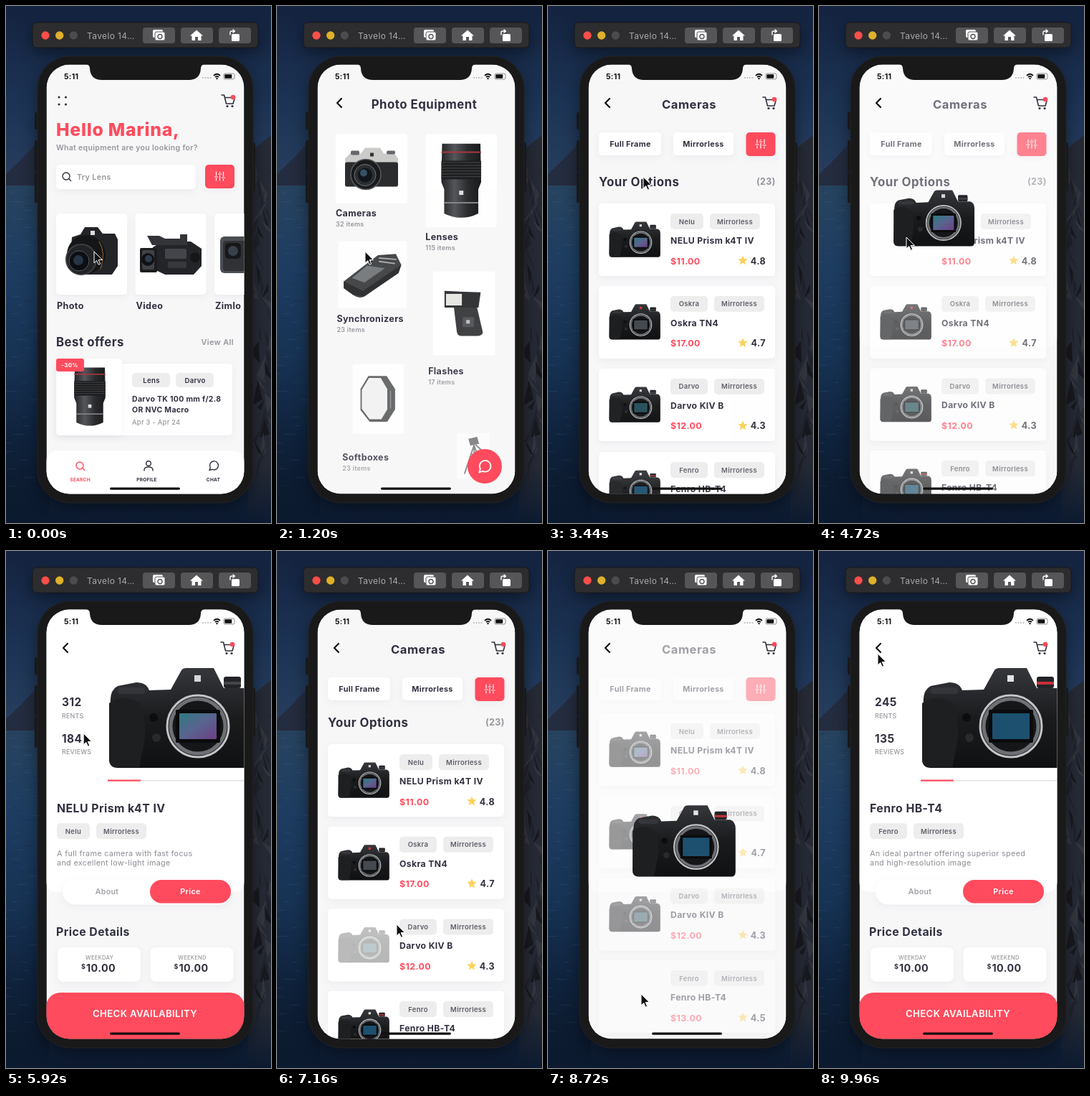
An HTML page for the animation above (10 s loop, 370 by 720 pixels).

```html
<!DOCTYPE html>
<html lang="en">
<head>
<meta charset="utf-8">
<title>Camera rental</title>
<style>
html, body { margin: 0; width: 100%; height: 100%; overflow: hidden; background: #12233f; }
svg { display: block; }
text { font-family: Inter, sans-serif; letter-spacing: .03em; }
.line { fill: none; stroke-linecap: round; stroke-linejoin: round; }
.card { filter: drop-shadow(0 3px 5px rgba(40, 40, 70, .05)); }
.window { filter: drop-shadow(0 7px 10px rgba(0, 0, 0, .4)); }
</style>
</head>
<body>
<svg id="stage" width="370" height="720" viewBox="0 0 370 720"></svg>
<script>
const LOOP = 10000;
const RED = '#ff4b5d', INK = '#30303f', GRAY = '#96969c', PAGE = '#f7f7f8', DARK = '#232427';

// Drawing helpers
const rect = (x, y, w, h, r, fill, more = '') =>
  `<rect x="${x}" y="${y}" width="${w}" height="${h}" rx="${r}" fill="${fill}" ${more}/>`;
const dot = (x, y, r, fill, more = '') => `<circle cx="${x}" cy="${y}" r="${r}" fill="${fill}" ${more}/>`;
const ring = (x, y, r, fill, color, width) => dot(x, y, r, fill, `stroke="${color}" stroke-width="${width}"`);
const path = (d, fill) => `<path d="${d}" fill="${fill}"/>`;
const line = (d, color, width = 1.5) => `<path class="line" d="${d}" stroke="${color}" stroke-width="${width}"/>`;
const text = (x, y, size, weight, fill, str, anchor = 'start') =>
  `<text x="${x}" y="${y}" font-size="${size}" font-weight="${weight}" fill="${fill}" text-anchor="${anchor}">${str}</text>`;
const mid = (x, y, size, weight, fill, str) => text(x, y, size, weight, fill, str, 'middle');
const group = (id, ...body) => `<g id="${id}">${body.join('')}</g>`;
const at = (x, y, body, s = 1) => `<g transform="translate(${x} ${y}) scale(${s})">${body}</g>`;
const card = (x, y, w, h, r = 5, fill = '#fff') => rect(x, y, w, h, r, fill, 'class="card"');
const tagWidth = str => Math.min(70, 22 + 6 * str.length);
const tag = (x, y, str) => rect(x, y, tagWidth(str), 22, 5, '#ededee') +
  mid(x + tagWidth(str) / 2, y + 14.5, 9.5, 600, '#5c5c66', str);
const tags = (x, y, brand) => tag(x, y, brand) + tag(x + tagWidth(brand) + 9, y, 'Mirrorless');
const times = (n, draw) => Array.from({ length: n }, (_, i) => draw(i)).join('');

let seed = 7;
const rand = (a, b) => {
  seed = seed * 16807 % 2147483647;
  return Math.round(a + (b - a) * seed / 2147483647);
};

// Icons
const back = (x, y) => line(`M${x + 3} ${y - 6}l-6 6 6 6`, '#111', 2.2);
const cart = (x, y) => at(x, y, line('M-9-8h3.5l3 12h9.5l2.5-8.5h-14', INK, 1.6) +
  dot(-1, 7.5, 1.6, INK) + dot(6, 7.5, 1.6, INK) + dot(7, -5, 3.3, RED));
const sliders = (x, y) => card(x - 20.5, y - 16, 41, 33, 5, RED) +
  at(x, y, line('M-5-6v5M-5 3v3M0-6v1M0-1v7M5-6v6M5 4v2M-7 1h4M-2-3h4M3 2h4', '#fff', 1.2));
const search = (x, y, c) => ring(x, y, 5, 'none', c, 1.4) + line(`M${x + 3.6} ${y + 3.6}l3 3`, c, 1.4);
const bubble = (x, y, c, s = 1) => at(x, y, line('M-6 6.5l1.3-3.6a6 6 0 1 1 2.6 2.4z', c, 1.4), s);
const star = (x, y) => {
  const point = i => {
    const a = i * Math.PI / 5, r = i % 2 ? 3.2 : 7;
    return `${(x + r * Math.sin(a)).toFixed(1)} ${(y - r * Math.cos(a)).toFixed(1)} `;
  };
  return path(`M${times(10, point)}Z`, '#fcd25b');
};

// Camera body without lens, about 200 wide and centred on 0,0
const camera = ({ sensor, accent, badge }) =>
  path('M-98-18Q-100-38-88-44L-62-49Q-48-49-44-38L-14-39 1-66Q3-69 8-69H46L60-41H90Q101-38 101-24V60Q101 70 92 70H-88Q-100 70-100 58Z', 'url(#body)') +
  path('M-100-20Q-80-34-57-20Q-48 0-50 30L-58 69H-88Q-100 70-100 56Z', '#1e1f21') +
  rect(-88, -42, 38, 9, 4, '#35363a') + rect(60, -57, 24, 16, 3, DARK) + rect(60, -50, 24, 4, 1, accent) +
  dot(-38, 0, 6, '#0c0d0e') + dot(-34, 28, 6, '#292a2d') +
  ring(24, 12, 43, '#1b1d20', '#c3c4c6', 3) + ring(24, 12, 38, '#141618', '#6d7074', 5) +
  rect(-7, -11, 62, 46, 2, '#0a0b0c') + rect(-2, -6, 52, 36, 1, sensor) + rect(19, -59, 9, 9, 0, badge);

const shot = (brand, name, price, rate, sensor, accent = '#44464a', badge = '#d5d6d8') =>
  ({ brand, name, price, rate, sensor, accent, badge });
const CAMS = [
  shot('Nelu', 'NELU Prism k4T IV', 11, 4.8, 'url(#iris)'),
  shot('Oskra', 'Oskra TN4', 17, 4.7, '#454a50', '#3a3b3f', '#d8333d'),
  shot('Darvo', 'Darvo KIV B', 12, 4.3, '#27505b'),
  shot('Fenro', 'Fenro HB-T4', 13, 4.5, '#1d506f', '#c8303b', '#e4e4e6'),
];

// Equipment pictures, each centred on 0,0
const lens = path('M-27-52H27L28 2 24 12V46Q0 58-24 46V12L-28 2Z', 'url(#barrel)') + rect(-28, -41, 56, 2, 0, '#a83741') +
  rect(-28, -28, 56, 26, 1, '#1c1d1f') + times(6, i => rect(-28, -26 + 4 * i, 56, 1, 0, '#4a4b4e')) +
  rect(-24, 30, 48, 2, 0, '#85868a') + rect(-3, 14, 6, 6, 0, '#ddd');
const slr = path('M-37-14L-30-21H-15L-9-29H12L17-21H32L37-14V25H-37Z', '#cbccca') + rect(-37, -9, 74, 34, 3, '#2b2c2e') +
  rect(-29, -25, 12, 6, 2, '#66676a') + rect(21, -25, 12, 5, 2, '#66676a') + rect(-2, -22, 5, 5, 0, '#333') +
  ring(-8, 8, 21, '#191a1c', '#565a5e', 1.5) + ring(-9, 9, 15, '#2c2f32', '#70757a', 1) + dot(-9, 9, 10, '#10161c') + dot(-11, 6, 5, '#375064');
const trigger = path('M-42 10L-8-16 8-28 34-30 42-14 38-4-12 32Q-20 36-28 30L-42 20Z', '#434446') +
  path('M-30 5L-8-13 18-9-12 12Z', '#777a7c') + path('M-42 10L-14 24 42-14 38-2-12 32-28 30-42 20Z', '#2b2c2e') + line('M10-24l24 2M10-19l22 3', '#aaa', 2);
const flash = path('M-27-31L23-29 20-8H-27Z', DARK) + path('M-25-27H-3V-11H-25Z', '#e4e4e0') +
  path('M-14-8H18L26 26Q25 31 18 31H-4Q-9 31-10 25Z', '#303134') + rect(-2, 5, 16, 14, 1, '#494b50') + rect(3, 9, 5, 5, 0, '#bbb');
const softbox = path('M-15-35H13L26-15V16L14 35H-13L-27 17V-15Z', '#4a4b4e') +
  path('M-14-32H4L14-15V16L5 31H-13L-25 15V-14Z', '#f1f1f1') + line('M19-12v26', '#85868a');
const tripod = path('M-8-28L6-31 9-20-5-17Z', '#46474a') + line('M1-18L-14 27M1-18L2 30M1-18L13 18M-4-4L7-2M4-18L15-8', '#4a4b4e', 2);

// Two columns of cards, stacked with a fixed gap
const KIT = [
  { name: 'Cameras', count: 32, pic: slr, h: 97 }, { name: 'Lenses', count: 115, pic: lens, h: 130 },
  { name: 'Synchronizers', count: 23, pic: trigger, h: 97 }, { name: 'Flashes', count: 17, pic: at(0, 0, flash, 1.16), h: 134 },
  { name: 'Softboxes', count: 23, pic: at(0, 0, softbox, 1.28), h: 136 }, { name: 'Tripods', count: 12, pic: at(0, 0, tripod, 1.9), h: 140 },
];
const bottoms = [129, 129];
KIT.forEach((item, i) => {
  const top = bottoms[i % 2] + 49;
  bottoms[i % 2] = top + item.h;
  item.x = i % 2 ? 257 : 132;
  item.y = top + item.h / 2;
});

// Desktop and phone
const scenery = rect(0, 0, 370, 270, 0, 'url(#sky)') + path('M0 234L17 218 44 190 60 182V262H0Z', '#242c3f') +
  rect(0, 250, 60, 470, 0, 'url(#sea)') + times(70, i => rect(rand(-8, 40), 254 + 6 * i, rand(4, 16), 1, 0, i % 2 ? '#5a7fa6' : '#081a30', 'opacity=".16"')) +
  path('M370 180L338 205V720H370Z', '#262a35') +
  times(45, i => {
    const x = rand(344, 368), y = 215 + 9 * i;
    return path(`M${x} ${y}l${rand(-16, 16)} ${rand(8, 30)} ${rand(-18, 18)} ${rand(4, 18)}Z`, ['#33363e', '#17191f', '#20232b'][i % 3]);
  }) + rect(0, 640, 370, 80, 0, 'url(#floor)');

const toolbar = `<g class="window">${rect(37, 23, 315, 35, 6, '#2d2d2f', 'stroke="#18191d"')}</g>` +
  ['#f94e4a', '#dfb02b', '#4c4c4f'].map((c, i) => dot(55 + 19.7 * i, 41, 5.7, c)).join('') + text(113, 45.5, 12, 400, '#a9a9ab', 'Tavelo 14…') +
  times(3, i => rect(191 + 53 * i, 30, 45, 22, 4, '#565658')) +
  rect(205, 33, 14, 11, 2, '#fff') + rect(208, 36, 14, 12, 2, '#fff', 'stroke="#565658"') + ring(215, 42.5, 3, 'none', '#565658', 1.4) +
  path('M257 41.5L266 33.5 275 41.5H272.5V48H268V43H264V48H259.5V41.5Z', '#fff') +
  rect(315, 39, 11, 10, 1.5, '#fff') + line('M313 40v-3q0-2 2-2h4M317 33l2.5 2-2.5 2', '#fff', 1.4);

const phone = '<g class="window">' + [148, 187, 231].map((y, i) => rect(40, y, 6, i ? 43 : 24, 2, '#17181a')).join('') +
  rect(343, 190, 5, 68, 2, '#17181a') + rect(44, 70, 301, 622, 45, '#19191a', 'stroke="#222224"') + '</g>';
const status = path('M112 81Q117 82 117 87Q118 103 134 103H255Q271 103 272 87Q272 82 277 81Z', '#19191a') +
  text(81, 102, 10.5, 700, '#111', '5:11') + times(4, i => dot(275 + 3.5 * i, 100, 1, '#b5b5b8')) +
  line('M290.5 96.5q4-3.5 8 0M292.5 98.7q2-1.8 4 0', '#111', 1.7) + dot(294.5, 101, 1.2, '#111') +
  rect(304, 94, 15, 8, 2, 'none', 'stroke="#777" stroke-width=".8"') + rect(305.3, 95.3, 10, 5.4, 1, '#111');

// Home
const photoPic = path('M92 322L104 318 110 308H128L135 317H152L156 325V362L148 374H103L90 352Z', DARK) + rect(118, 313, 6, 6, 0, '#ddd') +
  dot(112, 346, 27, '#141517') + ring(105, 353, 21, '#222326', '#3c3e41', 2) + ring(102, 355, 14, '#0b0e13', '#545960', 1) + dot(101, 354, 7, '#263443') + line('M130 328q10 16 2 38', '#a06a3a', 1);
const videoPic = path('M205 336L218 328H258L273 338V362L262 374H222L205 366Z', DARK) + path('M197 320H214L222 324H243V318H253V333H204Z', '#333438') +
  rect(187, 337, 24, 34, 2, '#1b1c1e') + rect(190, 340, 17, 27, 3, '#404247') + dot(198, 353, 9, '#0e1115') + dot(199, 352, 5, '#2e3b4a') +
  rect(222, 338, 30, 14, 2, '#43454a') + rect(226, 356, 26, 9, 2, '#36383c') + dot(264, 350, 7, '#151618');
const actionPic = rect(299, 321, 60, 51, 6, '#4b4e52') + rect(303, 327, 40, 42, 4, '#303236') + rect(306, 330, 22, 22, 5, '#17181a') + dot(317, 341, 7, '#39414b');
const tiles = [['Photo', photoPic], ['Video', videoPic], ['Zimlo', actionPic]].map(([name, pic], i) =>
  card(70 + 110.5 * i, 289, 99, 113) + pic + text(71 + 110.5 * i, 422, 12.6, 700, INK, name)).join('');

const home = [
  times(4, i => dot(74 + 9.5 * (i % 2), i < 2 ? 127 : 137, 1.6, INK)) + cart(310, 132) +
  text(70, 181, 24.8, 800, RED, 'Hello Marina,') + text(70, 201, 10.5, 600, GRAY, 'What equipment are you looking for?') +
  card(70, 221, 195, 34) + search(84, 237, INK) + text(99, 242, 10.8, 600, GRAY, 'Try Lens') + sliders(298.5, 237),
  tiles,
  text(70, 474, 16.8, 700, INK, 'Best offers') + text(318, 472, 11, 600, GRAY, 'View All', 'end') +
  card(70, 498, 246, 100) + card(70, 491, 92, 107) + at(117, 544, lens, .78) + rect(70, 491, 39, 18, 3, RED) + mid(89, 503, 8, 700, '#fff', '-30%') +
  ['Lens', 'Darvo'].map((s, i) => rect(176 + 61 * i, 511, 53, 20, 5, '#ededee') + mid(203 + 61 * i, 525, 9.6, 600, INK, s)).join('') +
  text(176, 551, 10.5, 700, INK, 'Darvo TK 100 mm f/2.8') + text(176, 566, 10.5, 700, INK, 'OR NVC Macro') + text(176, 583, 9.3, 500, GRAY, 'Apr 3 - Apr 24'),
  rect(56, 619, 277, 80, 16, '#fff') + search(103, 640, RED) + ring(199, 637, 3.3, 'none', INK, 1.4) + line('M193 647v-1q0-4 6-4t6 4v1', INK, 1.4) + bubble(290, 640, INK) +
  ['SEARCH', 'PROFILE', 'CHAT'].map((s, i) => mid(103.5 + 93 * i, 662, 6.6, 700, i ? INK : RED, s)).join(''),
].map((part, i) => group('home' + i, part)).join('');

// Equipment groups
const kit = group('kitHead', back(87, 135), mid(205.5, 142.5, 16.8, 700, INK, 'Photo Equipment')) +
  KIT.map(({ name, count, pic, h }, i) => group('item' + i, group('pic' + i, rect(-50, -h / 2, 100, h, 3, '#fff'), pic),
    text(-50, h / 2 + 18, 12.5, 700, INK, name), text(-50, h / 2 + 32, 9, 600, GRAY, count + ' items'))).join('') +
  group('chat', dot(0, 0, 24, RED), group('chatIcon', bubble(0, 0, '#fff', 1.3)));

// Camera list
const rowY = i => 269 + 114.7 * i;
const row = (c, i) => {
  const y = rowY(i);
  return group('row' + i, card(71, y, 246, 101), group('shot' + i, at(121, y + 50, camera(c), .355)), tags(171, y + 14, c.brand),
    text(171, y + 56, 12.2, 700, INK, c.name), text(171, y + 84.5, 12.4, 700, RED, `$${c.price}.00`),
    star(272, y + 79.5), text(304, y + 84.5, 12.6, 700, INK, c.rate, 'end'));
};
const list = group('list',
  group('listHead', mid(197, 142.5, 16.6, 700, INK, 'Cameras'), card(71, 176, 87, 32), mid(115, 196, 10.8, 700, INK, 'Full Frame'),
    card(175, 176, 84, 32), mid(217, 196, 10.8, 700, INK, 'Mirrorless'), sliders(297, 192)),
  '<g clip-path="url(#below)">', group('scroll', group('options', text(71, 245, 16.8, 700, INK, 'Your Options'),
    text(318, 242.5, 12.6, 700, GRAY, '(23)', 'end')), ...CAMS.map(row)), '</g>');

// Detail page
const stat = (y, n, label) => text(78, y, 15.4, 700, INK, n) + text(78, y + 16.5, 8.8, 500, GRAY, label);
const price = (x, day) => card(x, 552, 116, 48, 8) + mid(x + 58.5, 569, 7.6, 500, GRAY, day) +
  text(x + 33, 582, 9, 700, INK, '$') + text(x + 40, 586, 14.3, 700, INK, '10.00');
const detail = (k, c, rents, reviews, about) => [
  path('M56 81H333V459Q333 475 316 475H73Q56 475 56 459Z', '#fff'),
  stat(216, rents, 'RENTS') + stat(266.5, reviews, 'REVIEWS') + rect(142, 319, 190, 1.5, 0, '#e2e2e4') + rect(142, 318.5, 46, 2.2, 0, RED),
  text(71, 364, 15.8, 700, INK, c.name) + tags(71, 379, c.brand) + about.map((s, i) => text(71, 424.5 + 13 * i, 10.8, 400, '#8b8b93', s)).join(''),
  card(79, 457, 236, 35.5, 17.7) + rect(201, 458, 113, 32.5, 16, RED) + mid(141, 478, 10.8, 500, GRAY, 'About') + mid(257.5, 478, 10.8, 600, '#fff', 'Price'),
  text(70, 535.5, 15.8, 700, INK, 'Price Details') + price(72, 'WEEKDAY') + price(201.5, 'WEEKEND'),
  rect(56, 615, 277, 90, 20, RED) + mid(194, 649, 13.2, 600, '#fff', 'CHECK AVAILABILITY'),
].map((part, i) => group(k + i, part)).join('');

const ramp = (id, colors, x2 = 0, y2 = 1) => `<linearGradient id="${id}" x2="${x2}" y2="${y2}">${colors.map((c, i) =>
  `<stop offset="${i / (colors.length - 1)}" stop-color="${c}"/>`).join('')}</linearGradient>`;
const clip = (id, shape) => `<clipPath id="${id}">${shape}</clipPath>`;
const screen = rect(56.5, 81.5, 276, 598, 32, PAGE);

document.getElementById('stage').innerHTML = '<defs>' +
  ramp('sky', ['#14233f', '#1c3354', '#2a4161']) + ramp('sea', ['#27435f', '#1d3c60', '#173354', '#0f223c', '#0b1828']) + ramp('floor', ['#0c1a3000', '#0c1a30']) +
  ramp('body', ['#36373b', '#1a1b1d', '#101113']) + ramp('iris', ['#2f7a80', '#59648f', '#6d3f86'], 1, 1) + ramp('barrel', ['#232427', '#55565a', '#2a2b2d', '#1a1b1c'], 1, 0) +
  clip('screen', screen) + clip('below', rect(56, 211, 277, 480, 0, PAGE)) + '</defs>' +
  scenery + toolbar + phone + '<g clip-path="url(#screen)">' + screen + home + kit +
  detail('a', CAMS[0], 312, 184, ['A full frame camera with fast focus', 'and excellent low-light image']) +
  detail('b', CAMS[3], 245, 135, ['An ideal partner offering superior speed', 'and high-resolution image']) +
  list + group('nav', back(83, 135), cart(309, 135)) + group('heroA', camera(CAMS[0])) + group('heroB', camera(CAMS[3])) +
  rect(145, 670.5, 98, 3.2, 1.6, '#111') + '</g>' + status +
  group('cursor', '<path d="M0 0V16L3.7 12.5 6.2 18.2 8.6 17.2 6.2 11.5H11.4Z" fill="#111" stroke="#fff"/>');

// Motion
const span = (t, a, length) => Math.min(1, Math.max(0, (t - a) / length));
const smooth = u => u * u * (3 - 2 * u);
const easeOut = u => 1 - (1 - u) ** 3;
const mix = (a, b, u) => a + (b - a) * u;
const enter = (t, a) => easeOut(span(t, a, 400));
const press = (t, a) => 1 - .7 * Math.sin(Math.PI * span(t, a, 160));

const nodes = Object.fromEntries([...document.querySelectorAll('g[id]')].map(g => [g.id, g]));
function put(id, opacity, x = 0, y = 0, s = 1) {
  nodes[id].setAttribute('opacity', opacity);
  nodes[id].setAttribute('transform', `translate(${x} ${y}) scale(${s})`);
}
const rise = (id, u, dy) => put(id, u, 0, (1 - u) * dy);

// Cursor moves: start, length, end point
const MOVES = [[1600, 400, 133, 238], [3640, 560, 122, 322], [5700, 550, 83, 130], [6760, 360, 167, 520],
  [7200, 480, 167, 477], [7900, 500, 130, 617], [9200, 680, 82, 143]];

// The chosen camera flies from its row to the detail page
function fly(id, i, f, scroll) {
  put(id, f > 0 ? 1 : 0, mix(121, 244, f), mix(rowY(i) + 50 + scroll, 232, f), mix(.355, 1, f));
}

function openDetail(k, t, start, f, stay) {
  put(k + 0, f);
  for (let i = 1; i < 6; i++) rise(k + i, enter(t, start + 180 + 60 * i) * stay, i === 5 ? 70 : 22);
}

function render(t) {
  for (let i = 0; i < 4; i++) rise('home' + i, 1 - smooth(span(t, 60 + 40 * i, 440)), i === 3 ? 60 : 24);

  const kitLeft = 1 - span(t, 2520, 400);
  put('kitHead', enter(t, 800) * (1 - span(t, 2700, 240)));
  KIT.forEach(({ x, y }, i) => {
    const s = easeOut(span(t, 580 + 100 * i, 650)) * kitLeft;
    const drift = 32 * (1 - s);
    put('item' + i, s ** .6 * (i ? 1 : press(t, 2320)), x + drift, y + drift);
    put('pic' + i, 1, 0, 0, s);
  });
  const chat = enter(t, 840) * kitLeft;
  put('chat', chat, 290, 641, .85 + .15 * chat);
  put('chatIcon', Math.max(0, 2 * chat - 1));

  const a = easeOut(span(t, 4680, 340)) * (1 - smooth(span(t, 6400, 340)));
  const b = easeOut(span(t, 8640, 340));
  const scroll = t < 5000 ? 6 : -43 * smooth(span(t, 7200, 500));
  put('nav', enter(t, 2960));
  put('list', 1 - a - b);
  put('scroll', 1, 0, scroll);
  rise('listHead', enter(t, 2960), 16);
  rise('options', enter(t, 3040), 20);
  CAMS.forEach((_, i) => rise('row' + i, enter(t, 3040 + 50 * i), 40));
  put('shot0', a ? 0 : press(t, 4380));
  put('shot2', press(t, 7080));
  put('shot3', b ? 0 : press(t, 8440));

  fly('heroA', 0, a, scroll);
  fly('heroB', 3, b, scroll);
  openDetail('a', t, 4680, a, 1 - span(t, 6400, 240));
  openDetail('b', t, 8640, b, 1);

  let [x, y] = [123, 342];
  for (const [start, length, toX, toY] of MOVES) {
    const u = smooth(span(t, start, length));
    x = mix(x, toX, u);
    y = mix(y, toY, u);
  }
  put('cursor', 1, x, y);
}

const born = performance.now();
function tick(now) {
  render(Math.max(0, now - born) % LOOP);
  requestAnimationFrame(tick);
}
render(0);
requestAnimationFrame(tick);
</script>
</body>
</html>
```
